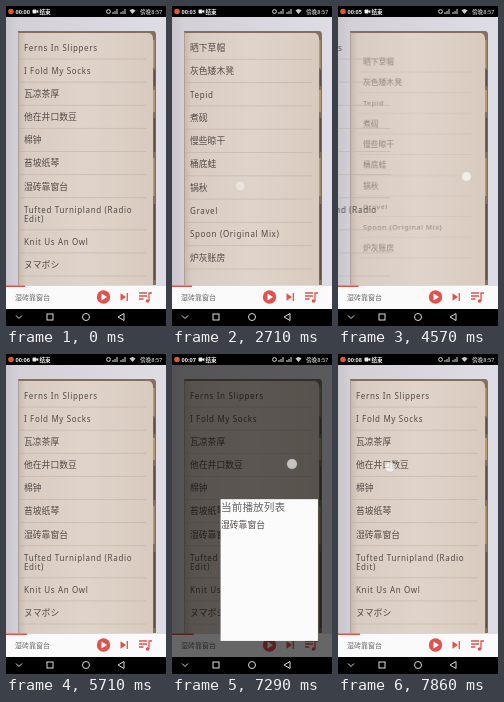
Recreate the animation shown at these times as an HTML page. Size 160 by 320 pixels, loop 8 s.

```html
<!DOCTYPE html>
<html lang="zh">
<head>
<meta charset="utf-8">
<style>
html, body { margin: 0; width: 100%; height: 100%; overflow: hidden; background: #000; }
svg { display: block; width: 100vw; height: 100vh; font-family: "Noto Sans", "Noto Sans CJK SC", "Noto Sans CJK", sans-serif; }
.row { font-size: 8.8px; fill: #514a47; }
.latin { font-size: 8px; letter-spacing: .65px; }
.rule { stroke: #b9aca3; stroke-width: .5; }
.status { font-size: 5.6px; fill: #eee; }
.line { fill: none; stroke: #ddd; stroke-width: 1; }
.red { fill: #e0524b; }
.red-line { fill: none; stroke: #e0524b; stroke-width: 1.3; }

#first, #second, #touch, #dim, #dialog, #progress { animation: 8s linear infinite; }
#first { animation-name: slide; }
#second { animation-name: rise; transform-origin: 80px 165px; }
#touch { animation-name: touch; }
#dim { animation-name: dim; }
#dialog { animation-name: dialog; transform-origin: 97px 216px; }
#progress { animation-name: progress; }

@keyframes slide {
  0%, 3.75% { transform: translateX(0); }
  15.6% { transform: translateX(-75px); }
  21.4% { transform: translateX(-144px); }
  23.75%, 53.6% { transform: translateX(-160px); }
  57.5% { transform: translateX(-80px); }
  60.75%, 100% { transform: translateX(0); }
}
@keyframes rise {
  0%, 3.75% { transform: scale(.75); opacity: 0; }
  15.6% { transform: scale(.867); opacity: .47; }
  21.4% { transform: scale(.976); opacity: .9; }
  23.75%, 53.6% { transform: scale(1); opacity: 1; }
  57.5% { transform: scale(.875); opacity: .5; }
  60.75%, 100% { transform: scale(.75); opacity: 0; }
}
@keyframes touch {
  0%, 1.75% { transform: translate(136px, 190px); opacity: 0; }
  3.6% { transform: translate(135px, 190px); opacity: 1; }
  15.6%, 21.4% { transform: translate(72px, 185px); opacity: 1; }
  23.25% { transform: translate(72px, 185px); opacity: 0; }
  23.3% { transform: translate(130px, 185px); opacity: 0; }
  25% { transform: translate(130px, 185px); opacity: 1; }
  32.5% { transform: translate(70px, 180px); opacity: 1; }
  35.75% { transform: translate(66px, 180px); opacity: 0; }
  35.8%, 41% { transform: translate(138px, 174px); opacity: 0; }
  42.9% { transform: translate(137px, 173px); opacity: 1; }
  48.25% { transform: translate(135px, 172px); opacity: 1; }
  52.5% { transform: translate(80px, 175px); opacity: 1; }
  53.6% { transform: translate(65px, 175px); opacity: 1; }
  57.5% { transform: translate(135px, 170px); opacity: 1; }
  60.75% { transform: translate(138px, 170px); opacity: 0; }
  60.8%, 64.1% { transform: translate(141px, 289px); opacity: 0; }
  64.2%, 65% { transform: translate(141px, 289px); opacity: 1; }
  66.1% { transform: translate(141px, 289px); opacity: 0; }
  66.2%, 91% { transform: translate(120px, 110px); opacity: 0; }
  91.1%, 93.75% { transform: translate(120px, 110px); opacity: 1; }
  94.6% { transform: translate(120px, 110px); opacity: 0; }
  94.7%, 96.25% { transform: translate(52px, 113px); opacity: 0; }
  96.5%, 100% { transform: translate(52px, 113px); opacity: 1; }
}
@keyframes dim {
  0%, 71.4% { opacity: 0; }
  75%, 91.1% { opacity: .6; }
  92.9% { opacity: .22; }
  93.75%, 100% { opacity: 0; }
}
@keyframes dialog {
  0%, 71.4% { transform: scale(.9); opacity: 0; }
  74.2%, 91.1% { transform: scale(1); opacity: 1; }
  92.75%, 100% { transform: scale(.95); opacity: 0; }
}
@keyframes progress {
  from { transform: scaleX(.88); }
  to { transform: scaleX(1); }
}
</style>
</head>
<body>
<svg viewBox="0 0 160 320" preserveAspectRatio="none">
  <defs>
    <linearGradient id="desk" x2="1" y2="0">
      <stop offset="0" stop-color="#c9c5cc"/>
      <stop offset=".08" stop-color="#d3d0d7"/>
      <stop offset="1" stop-color="#dedce5"/>
    </linearGradient>
    <linearGradient id="paper" x2="1" y2="0">
      <stop offset="0" stop-color="#c6b8ae"/>
      <stop offset=".06" stop-color="#d9ccc2"/>
      <stop offset=".5" stop-color="#e0d4ca"/>
      <stop offset="1" stop-color="#d8cabe"/>
    </linearGradient>
  </defs>

  <rect y="11" width="160" height="270" fill="url(#desk)"/>
  <path d="M12 25H147Q150 25 150 29V279H12Z" fill="#85705b"/>
  <path d="M147.500 34v28M148 84v22M147.500 152v38" stroke="#b99a68" stroke-width="2"/>
  <path d="M148.500 64v16M148.500 112v34M148.500 198v76" stroke="#5f4e42" stroke-width="1.500"/>
  <path d="M12 27H143Q147 28 147 33V279H12Z" fill="url(#paper)"/>
  <path d="M12.500 26V279" stroke="#a5968d" stroke-width=".7"/>

  <g id="second"></g>
  <g id="first"></g>

  <rect y="280" width="160" height="23" fill="#fbfafb"/>
  <rect id="progress" y="279.500" width="22" height="1.500" class="red"/>
  <text x="9" y="293.600" font-size="7" fill="#666">湿砖靠窗台</text>
  <circle cx="97.500" cy="291" r="6.700" class="red"/>
  <path d="M95.500 287.500L101 291L95.500 294.500Z" fill="#fff"/>
  <path d="M114.500 287.300L120 291L114.500 294.700Z" class="red"/>
  <path d="M121.300 287v8" class="red-line"/>
  <path d="M133 287h8M133 290h8M133 293h4.500M143 295v-8h3" class="red-line"/>
  <circle cx="141.500" cy="295" r="1.800" class="red"/>

  <rect id="dim" y="11" width="160" height="292"/>
  <g id="dialog">
    <rect x="48.500" y="145" width="97.500" height="142" fill="#fff"/>
    <text x="49" y="157" font-size="10.700" fill="#696969">当前播放列表</text>
    <text x="49" y="174.300" class="row">湿砖靠窗台</text>
  </g>

  <rect width="160" height="11"/>
  <circle cx="5" cy="5.500" r="2.800" fill="#e2572f"/>
  <text id="clock" x="9.500" y="7.600" class="status" font-weight="600">00:00</text>
  <rect x="26.500" y="3.500" width="4" height="4" rx="1" fill="#eee"/>
  <path d="M30 5.500l2.300-1.700v3.400Z" fill="#eee"/>
  <text x="33.500" y="7.600" class="status" font-weight="600">结束</text>
  <circle cx="102.500" cy="5.500" r="1.900" class="line" stroke-width=".7"/>
  <path d="M107 8V6M109 8V5M111 8V3M115 8V6M117 8V5M119 8V3" class="line"/>
  <path d="M123.500 4.500q3-3 6 0L126.500 8Z" fill="#ccc"/>
  <text x="134" y="7.600" class="status" font-size="5">傍晚8:57</text>

  <rect y="303" width="160" height="17"/>
  <path d="M10 309.500l3 3 3-3" class="line"/>
  <rect x="41" y="308" width="6" height="6" class="line"/>
  <circle cx="80" cy="311" r="3.500" class="line"/>
  <path d="M118 307.500v7l-6-3.500Z" class="line"/>

  <g id="touch">
    <circle r="5" fill="#fff" fill-opacity=".65" stroke="#aaa" stroke-opacity=".5" stroke-width=".6"/>
  </g>
</svg>
<script>
const pages = {
  first: ["Ferns In Slippers", "I Fold My Socks", "瓦凉茶厚", "他在井口数豆", "棉钟", "苔坡纸琴",
    "湿砖靠窗台", "Tufted Turnipland (Radio|Edit)", "Knit Us An Owl", "ヌマボシ"],
  second: ["晒下草帽", "灰色矮木凳", "Tepid", "煮砚", "慢些晾干", "桶底蛙", "锅秋", "Gravel",
    "Spoon (Original Mix)", "炉灰账房"]
};

function add(parent, tag, attrs, text = "") {
  const node = document.createElementNS("http://www.w3.org/2000/svg", tag);
  for (const [key, value] of Object.entries(attrs)) node.setAttribute(key, value);
  node.textContent = text;
  parent.append(node);
}

function fillPage(id, titles, rowHeight) {
  const page = document.getElementById(id);
  let y = 41.8;
  for (const title of titles) {
    const lines = title.split("|");
    lines.forEach((line, i) => {
      const latin = /^[ -~]+$/.test(line);
      add(page, "text", { x: 18, y: y + i * 9 + 3.1, class: latin ? "row latin" : "row" }, line);
    });
    y += rowHeight + (lines.length - 1) * 9;
    add(page, "line", { x1: 13, x2: 140, y1: y - 11.8, y2: y - 11.8, class: "rule" });
  }
}

fillPage("first", pages.first, 23.1);
fillPage("second", pages.second, 23.3);

const clock = document.getElementById("clock");
let start;
function tick(now) {
  start ??= now;
  const seconds = Math.floor(((now - start) % 8000 + 430) / 1000);
  clock.textContent = "00:0" + seconds;
  requestAnimationFrame(tick);
}
requestAnimationFrame(tick);
</script>
</body>
</html>
```
